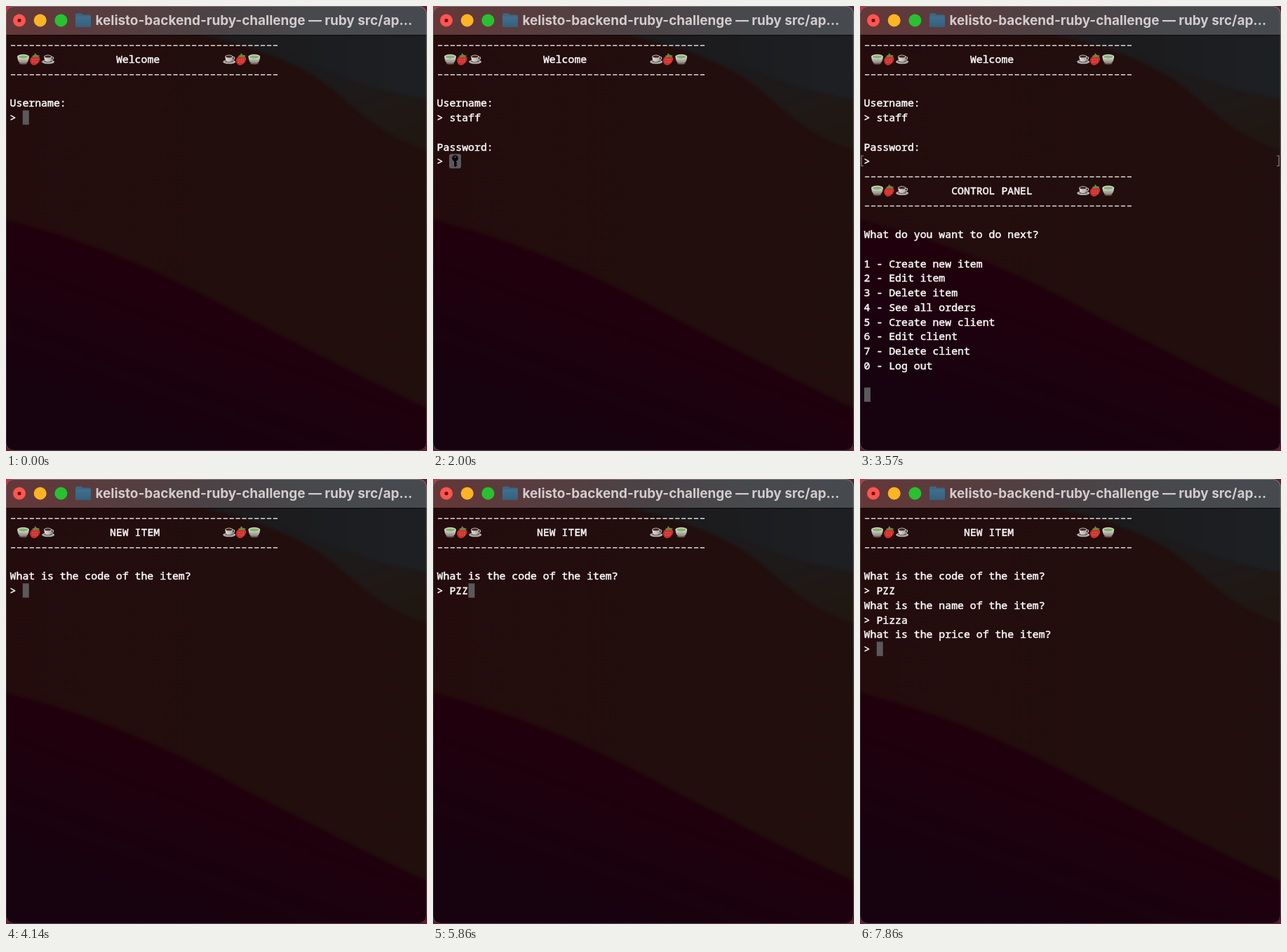
Animation, 600 px wide and 633 px high, one loop 8 s. Source, as an HTML page with a canvas:

```html
<!DOCTYPE html>
<html lang="en">
<head>
<meta charset="utf-8">
<title>Terminal</title>
<style>
html, body { margin: 0; width: 100%; height: 100%; overflow: hidden; background: #2a0a15; }
canvas { display: block; width: 600px; height: 633px; }
</style>
</head>
<body>
<canvas id="stage" width="600" height="633"></canvas>
<script>
const LOOP = 8000;
const LEFT = 5.6, CELL = 8.9, ROW = 20.75, FIRST = 55;
const MONO = '500 14.83px "Noto Sans Mono", "DejaVu Sans Mono", monospace';
const USER = 'staff';
const MENU = ['1 - Create new item', '2 - Edit item', '3 - Delete item', '4 - See all orders',
  '5 - Create new client', '6 - Edit client', '7 - Delete client', '0 - Log out'];

const stage = document.getElementById('stage').getContext('2d');
const backdrop = document.createElement('canvas');
backdrop.width = 600;
backdrop.height = 633;
let ctx = stage;

const colX = col => LEFT + col * CELL;
const rowY = row => FIRST + row * ROW;

// The part of the text whose keys have been pressed by time t
const typed = (text, times, t) => text.slice(0, times.filter(k => t >= k).length);

function gradient(x0, y0, x1, y1, ...stops) {
  const g = ctx.createLinearGradient(x0, y0, x1, y1);
  stops.forEach((c, i) => g.addColorStop(i / (stops.length - 1), c));
  return g;
}

function ellipse(x, y, rx, ry, fill) {
  ctx.fillStyle = fill;
  ctx.beginPath();
  ctx.ellipse(x, y, rx, ry, 0, 0, Math.PI * 2);
  ctx.fill();
}

function box(x, y, w, h, r, fill) {
  ctx.fillStyle = fill;
  ctx.beginPath();
  ctx.roundRect(x, y, w, h, r);
  ctx.fill();
}

function shape(path, fill) {
  ctx.fillStyle = fill;
  ctx.fill(new Path2D(path));
}

function wallpaper() {
  ctx.fillStyle = gradient(0, 0, 600, 0, '#240c0d', '#220e0d', '#210f0d');
  ctx.fillRect(0, 0, 600, 633);
  ctx.filter = 'blur(2px)';
  shape('M250 36 C340 52 400 76 440 100 C490 132 520 180 600 205 L620 210 V20 Z',
    gradient(470, 50, 520, 205, '#1c1b1d', '#1e1a1a', '#211711'));
  shape('M330 36 C430 80 500 118 600 132 L620 134 V20 Z',
    gradient(350, 0, 600, 0, '#1c1b1d', '#1d2023'));
  shape('M-20 299 L0 304 C140 340 250 392 345 445 C430 488 520 535 600 572 L620 581 V660 H-20 Z',
    gradient(330, 390, 240, 633, '#22000b', '#1d010e', '#16030f'));
  ctx.filter = 'none';
}

function titleBar() {
  ctx.fillStyle = gradient(0, 0, 600, 0, '#653738', '#573d3f', '#4b4346', '#474a4d', '#464a4e');
  ctx.fillRect(0, 0, 600, 41);
  ctx.fillStyle = '#0d0708';
  ctx.fillRect(0, 41, 600, 1);
  ['#fc5650', '#fdb424', '#28c131'].forEach((c, i) => ellipse(19 + i * 29.7, 20.5, 9, 9, c));
  ellipse(19, 20.5, 2.6, 2.6, '#7a0a0a');
  box(99, 10.5, 10, 6, 2, '#3a6784');
  box(99, 12.5, 22, 17.5, 2, '#3a6784');
  box(99, 15, 22, 15, 2, gradient(0, 15, 0, 30, '#426f8c', '#34607e'));
  ctx.fillStyle = '#d3cbcc';
  ctx.font = '700 18.9px Inter, "Liberation Sans", sans-serif';
  ctx.fillText('kelisto-backend-ruby-challenge — ruby src/ap…', 127.5, 27);
}

function background() {
  ctx.fillStyle = gradient(0, 0, 600, 633, '#c93349', '#5c2030', '#6a1c36');
  ctx.fillRect(0, 0, 600, 633);
  ctx.save();
  ctx.beginPath();
  ctx.roundRect(0, 0, 600, 632.5, 11);
  ctx.clip();
  wallpaper();
  titleBar();
  ctx.restore();
  ctx.strokeStyle = gradient(0, 0, 0, 633, '#88797c', '#5c5355', '#5f4d56');
  ctx.lineWidth = 1;
  ctx.beginPath();
  ctx.roundRect(0, 0.5, 599.3, 631.8, 11);
  ctx.stroke();
}

function write(text, row, col = 0) {
  const x = colX(col), y = rowY(row) + 5.4;
  ctx.font = MONO;
  ctx.fillStyle = ctx.strokeStyle = '#fbf9f9';
  ctx.lineWidth = 0.5;
  ctx.fillText(text, x, y);
  ctx.strokeText(text, x, y);
}

function cursor(row, col) {
  ctx.fillStyle = '#5b595b';
  ctx.fillRect(colX(col) + 0.4, rowY(row) - 10.3, CELL, ROW - 0.4);
}

function prompt(text, row, active) {
  write('> ' + text, row);
  if (active) cursor(row, 2 + text.length);
}

function tea(x, y) {
  ellipse(x + 9, y + 5.6, 6, 2, '#6b4f3c');
  shape(`M${x + 0.7} ${y - 3.5} h16.6 q-0.5 8 -5 9.3 h-6.6 q-4.5 -1.3 -5 -9.3 Z`,
    gradient(0, y - 3, 0, y + 6, '#d3d4d0', '#85837e'));
  ellipse(x + 9, y - 3.7, 8.4, 3.3, '#dfe2da');
  ellipse(x + 9, y - 3.4, 7, 2.3, '#86b36c');
}

function strawberry(x, y) {
  shape(`M${x + 1.5} ${y - 1} q5 -7 11 -4 q5 4 1 9 q-4 5 -8 4.5 q-4 -2 -4.5 -5.5 q-0.5 -2 0.5 -4 Z`,
    '#cf2f31');
  shape(`M${x + 4} ${y - 5} l3 -1 1 -3 2 2.5 5 1.5 -3 2 -3 -0.5 -3 1 Z`, '#5c8f3c');
  for (let i = 0; i < 6; i++) {
    ellipse(x + 5 + i % 3 * 3, y + 0.5 + (i > 2) * 3.2, 0.5, 0.7, '#f1a06d');
  }
}

function coffee(x, y) {
  ellipse(x + 9, y + 3.6, 9, 3, '#b9b5b2');
  ellipse(x + 9, y + 3, 6.4, 1.8, '#6f6a68');
  ctx.strokeStyle = '#c4c0bd';
  ctx.lineWidth = 1.2;
  ctx.beginPath();
  ctx.ellipse(x + 14, y - 1.6, 2.4, 1.8, 0, 0, Math.PI * 2);
  ctx.stroke();
  shape(`M${x + 3.2} ${y - 4} h10.8 q0 6.5 -3.8 7.6 h-3.2 q-3.8 -1.1 -3.8 -7.6 Z`,
    gradient(x + 3, 0, x + 14, 0, '#e2dfdc', '#a9a5a2'));
  ellipse(x + 8.6, y - 4, 5.4, 2.2, '#dedbd8');
  ellipse(x + 8.6, y - 3.8, 4.5, 1.6, '#3f2419');
}

function header(title, row, col) {
  ctx.strokeStyle = '#dcd7d7';
  ctx.lineWidth = 1.5;
  ctx.setLineDash([6.2, CELL - 6.2]);
  for (const r of [row, row + 2]) {
    ctx.beginPath();
    ctx.moveTo(colX(0) + 1.4, rowY(r) + 1.2);
    ctx.lineTo(colX(43), rowY(r) + 1.2);
    ctx.stroke();
  }
  ctx.setLineDash([]);
  const y = rowY(row + 1);
  [tea, strawberry, coffee].forEach((icon, i) => {
    icon(colX(1 + 2 * i) + 1, y);
    icon(colX(38 - 2 * i) + 1, y);
  });
  write(title, row + 1, col);
}

function key(row) {
  const x = colX(2) - 0.4, y = rowY(row) - 10.6;
  box(x, y, 17, 20.5, 3, '#5b595b');
  ellipse(x + 8.5, y + 6.2, 4.4, 4.4, '#080607');
  ellipse(x + 8.5, y + 4.4, 1.1, 1.1, '#5b595b');
  ctx.fillStyle = '#080607';
  ctx.fillRect(x + 7.2, y + 9, 2.6, 9.2);
  ctx.fillRect(x + 9, y + 12, 2.2, 2);
  ctx.fillRect(x + 9, y + 15, 2.2, 2);
}

function brackets(row) {
  const y = rowY(row);
  ctx.strokeStyle = '#8b8283';
  ctx.lineWidth = 1.2;
  for (const [x, dx] of [[2, 3], [597, -3]]) {
    ctx.beginPath();
    ctx.moveTo(x + dx, y - 8);
    ctx.lineTo(x, y - 8);
    ctx.lineTo(x, y + 6.5);
    ctx.lineTo(x + dx, y + 6.5);
    ctx.stroke();
  }
}

function login(t) {
  const asking = t < 710, inside = t >= 2290;
  header('Welcome', 0, 17);
  write('Username:', 4);
  // The first two letters land together
  prompt(typed(USER, [140, 140, 290, 430, 570], t), 5, asking);
  if (asking) return;
  write('Password:', 7);
  write('>', 8);
  if (!inside) return key(8);
  brackets(8);
  header('CONTROL PANEL', 9, 14);
  write('What do you want to do next?', 13);
  MENU.forEach((line, i) => write(line, 15 + i));
  const choice = typed('1', [3710], t);
  write(choice, 24);
  cursor(24, choice.length);
}

function newItem(t) {
  const named = t >= 6000, priced = t >= 7430;
  header('NEW ITEM', 0, 16);
  write('What is the code of the item?', 4);
  prompt(typed('PZZ', [5430, 5570, 5710], t), 5, !named);
  if (!named) return;
  write('What is the name of the item?', 6);
  prompt(typed('Pizza', [6430, 6570, 6710, 6860, 7000], t), 7, !priced);
  if (!priced) return;
  write('What is the price of the item?', 8);
  prompt('', 9, true);
}

function draw(now) {
  const t = now % LOOP;
  ctx.drawImage(backdrop, 0, 0);
  (t < 4140 ? login : newItem)(t);
}

// The window never changes, so paint it once
ctx = backdrop.getContext('2d');
background();
ctx = stage;

const start = performance.now();
function tick() {
  draw(performance.now() - start);
  requestAnimationFrame(tick);
}
tick();
</script>
</body>
</html>
```
